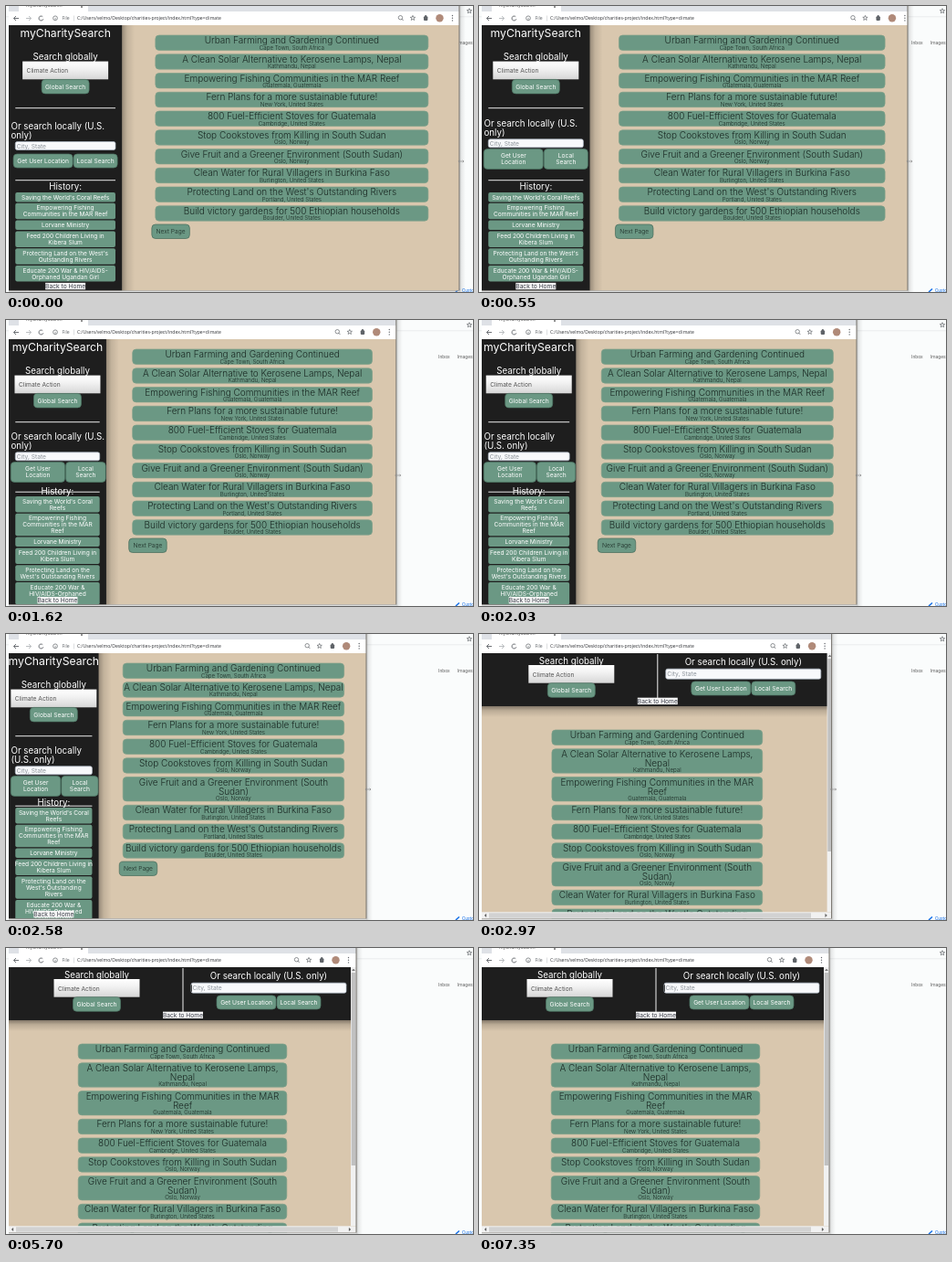
Animation, 512 px wide and 313 px high, one loop 7.45 s. Source, as an HTML page with a canvas:

```html
<!DOCTYPE html>
<html lang="en">
<head>
<meta charset="utf-8">
<title>Resizing a charity search page</title>
<style>
html, body { margin: 0; width: 100%; height: 100%; overflow: hidden; background: #fafcfc; }
canvas { display: block; width: 512px; height: 313px; }
</style>
</head>
<body>
<canvas id="stage" width="512" height="313"></canvas>
<script>
const ctx = document.getElementById('stage').getContext('2d');
const LOOP = 7450, LEFT = 3, BOTTOM = 311.5, BREAKPOINT = 390;
const GREEN = '#6b9884', DARK = '#1e1e1e', TAN = '#d9c7ae', INK = '#1b2a24';
const BODY = 6.67, HEADING = 9.75;

// Piecewise linear motion: [time, value, ...]
const edgeTrack = [[0, 497], [550, 470], [785, 455], [1150, 435.7], [1585, 429],
  [2030, 414], [2370, 406], [2580, 395], [3090, 384]];
const layoutTrack = [[0, 498], [550, 475.5], [785, 459], [1150, 436.7], [1585, 430],
  [2030, 414.7], [2370, 407], [2580, 395.7], [3000, 387], [3310, 384]];
const pointerTrack = [[3100, 390, 167], [3960, 390, 167], [4350, 424, 226],
  [4700, 467, 296], [4900, 504, 316]];

// Title, place, card width below which the title breaks at "|"
const cards = [
  ['Urban Farming and Gardening Continued', 'Cape Town, South Africa', 0],
  ['A Clean Solar Alternative to Kerosene Lamps,| Nepal', 'Kathmandu, Nepal', 238],
  ['Empowering Fishing Communities in the MAR| Reef', 'Guatemala, Guatemala', 235],
  ['Fern Plans for a more sustainable future!', 'New York, United States', 0],
  ['800 Fuel-Efficient Stoves for Guatemala', 'Cambridge, United States', 0],
  ['Stop Cookstoves from Killing in South Sudan', 'Oslo, Norway', 0],
  ['Give Fruit and a Greener Environment (South| Sudan)', 'Oslo, Norway', 246],
  ['Clean Water for Rural Villagers in Burkina Faso', 'Burlington, United States', 0],
  ["Protecting Land on the West's Outstanding| Rivers", 'Portland, United States', 234],
  ['Build victory gardens for 500 Ethiopian| households', 'Boulder, United States', 230]
];

// Line breaks for the wide, medium and narrow sidebar
const historyItems = [
  ["Saving the World's Coral Reefs", "Saving the World's Coral|Reefs"],
  ['Empowering Fishing|Communities in the MAR Reef', 'Empowering Fishing|Communities in the MAR|Reef'],
  ['Lorvane Ministry'],
  ['Feed 200 Children Living in|Kibera Slum'],
  ["Protecting Land on the West's|Outstanding Rivers", "Protecting Land on the|West's Outstanding Rivers",
    "Protecting Land on the|West's Outstanding|Rivers"],
  ['Educate 200 War & HIV/AIDS-|Orphaned Ugandan Girl', 'Educate 200 War &|HIV/AIDS-Orphaned|Ugandan Girl']
];

function sample(track, t, column = 1) {
  if (t <= track[0][0]) return track[0][column];
  for (let i = 1; i < track.length; i++) {
    const a = track[i - 1], b = track[i];
    if (t <= b[0]) return a[column] + (b[column] - a[column]) * (t - a[0]) / (b[0] - a[0]);
  }
  return track[track.length - 1][column];
}

function rect(x, y, w, h, color) {
  ctx.fillStyle = color;
  ctx.fillRect(x, y, w, h);
}

function box(x, y, w, h, radius, fill, stroke) {
  ctx.beginPath();
  ctx.roundRect(x, y, w, h, radius);
  ctx.fillStyle = fill;
  ctx.fill();
  if (stroke) {
    ctx.strokeStyle = stroke;
    ctx.lineWidth = 0.7;
    ctx.stroke();
  }
}

// y is the middle of the capital letters
function text(str, x, y, size, color, align = 'center', weight = 400, family = 'Inter') {
  ctx.font = `${weight} ${size}px ${family}, sans-serif`;
  ctx.textAlign = align;
  ctx.fillStyle = color;
  ctx.fillText(str, x, y + size * 0.36);
}

function path(points, color, width = 0.9, fill) {
  ctx.beginPath();
  points.forEach(([x, y]) => ctx.lineTo(x, y));
  if (fill) {
    ctx.closePath();
    ctx.fillStyle = fill;
    ctx.fill();
  }
  ctx.strokeStyle = color;
  ctx.lineWidth = width;
  ctx.stroke();
}

function circle(x, y, r, fill, stroke) {
  ctx.beginPath();
  ctx.arc(x, y, r, 0, Math.PI * 2);
  if (fill) { ctx.fillStyle = fill; ctx.fill(); }
  if (stroke) { ctx.strokeStyle = stroke; ctx.lineWidth = 0.7; ctx.stroke(); }
}

function shade(x, y, w, h, dx, dy, alpha) {
  const g = ctx.createLinearGradient(x, y, x + dx, y + dy);
  g.addColorStop(0, `rgba(0,0,0,${alpha})`);
  g.addColorStop(0.4, `rgba(0,0,0,${alpha * 0.35})`);
  g.addColorStop(1, 'rgba(0,0,0,0)');
  rect(x, y, w, h, g);
}

function star(x, y) {
  const points = Array.from({ length: 11 }, (_, i) => {
    const r = i % 2 ? 1.2 : 2.8, a = i * Math.PI / 5 - Math.PI / 2;
    return [x + r * Math.cos(a), y + r * Math.sin(a)];
  });
  path(points, '#5f6368', 0.7);
}

function button(x, y, w, h, lines) {
  box(x, y, w, h, 4, GREEN, '#4f7a68');
  lines.forEach((line, i) =>
    text(line, x + w / 2, y + h / 2 + (i - (lines.length - 1) / 2) * 7, BODY, '#fff'));
}

function searchField(mid, y) {
  const g = ctx.createLinearGradient(0, y, 0, y + 20);
  g.addColorStop(0, '#fff');
  g.addColorStop(0.4, '#f2f2f2');
  g.addColorStop(1, '#d6d6d6');
  rect(mid - 47, y, 94, 19.7, g);
  text('Climate Action', mid - 42.5, y + 10.2, BODY, '#555', 'left');
  button(mid - 26, y + 19.8, 52, 15.5, ['Global Search']);
}

function cityField(x, y, w, h) {
  box(x, y, w, h, 2, '#f8f9fb', '#b4becb');
  text('City, State', x + 1.5, y + h / 2 + 0.3, BODY, '#8d949b', 'left');
}

function homeLink(x, y) {
  rect(x - 22, y - 3.8, 44, 7.4, '#f4f4f4');
  text('Back to Home', x, y, BODY, '#3c3f4a');
}

function backdrop() {
  rect(0, 0, 512, 313, '#fafcfc');
  rect(0, 11.5, 512, 0.7, '#e3e5e7');
  star(508, 5.5);
  text('Inbox', 474, 40, 5.2, '#666', 'left', 400, 'Roboto');
  text('Images', 494.5, 40, 5.2, '#666', 'left', 400, 'Roboto');
  path([[493, 313], [497, 309.5]], '#1a73e8', 1.6);
  text('Customize', 500, 311.5, 5, '#1a73e8', 'left', 400, 'Roboto');
}

function toolbar(right) {
  rect(0, 0, right, 8, '#dee1e6');
  box(14, -4, 76, 13, 3, '#fff');
  text('myCharitySearch', 22, -0.7, 5, '#555', 'left', 400, '"Open Sans"');
  path([[82, 0], [84, 2]], '#666', 0.7);
  path([[84, 0], [82, 2]], '#666', 0.7);
  rect(0, 6, right, 15, '#fff');
  const grey = '#5f6368';
  path([[14, 13.5], [8.5, 13.5]], grey);
  path([[11, 11], [8.5, 13.5], [11, 16]], grey);
  path([[22, 13.5], [27.5, 13.5]], '#b4b7ba');
  path([[25, 11], [27.5, 13.5], [25, 16]], '#b4b7ba');
  ctx.beginPath();
  ctx.arc(38.5, 13.5, 2.5, 0.3, 5.5);
  ctx.strokeStyle = grey;
  ctx.stroke();
  circle(54, 13.3, 2.4, null, grey);
  rect(53.7, 13, 0.7, 1.7, grey);
  text('File', 61.5, 13.3, 5.1, grey, 'left', 400, '"Open Sans"');
  rect(74, 10.5, 0.6, 6, '#c5c8cb');
  text('C:/Users/velmo/Desktop/charities-project/index.html?type=climate',
    78, 13.3, 5.1, '#303236', 'left', 400, '"Open Sans"');
  circle(right - 65.5, 12.7, 2.2, null, grey);
  path([[right - 64, 14.2], [right - 62.5, 15.8]], grey);
  star(right - 52, 13.2);
  box(right - 40, 11.5, 4.4, 4.4, 0.8, grey);
  circle(right - 37.8, 11.2, 1.2, grey);
  circle(right - 22.5, 13.2, 4.2, '#b08a79');
  for (const y of [10.5, 13.2, 15.9]) circle(right - 8.5, y, 0.7, grey);
}

function cardList(mid, width, top) {
  let y = top;
  for (const [title, place, minWidth] of cards) {
    const lines = width < minWidth ? title.split('|') : [title.replace('|', '')];
    const extra = (lines.length - 1) * 10;
    box(mid - width / 2, y, width, 16.4 + extra, 4, GREEN, '#7d9f88');
    lines.forEach((line, i) => text(line.trim(), mid, y + 5.4 + i * 10, 10, INK, 'center', 300));
    text(place, mid, y + 13.3 + extra, 6.15, INK, 'center', 300);
    y += 20.75 + extra;
  }
  const x = mid - width / 2 - 4;
  box(x, y - 0.5, 41.5, 15.5, 4, GREEN, '#456b5a');
  text('Next Page', x + 20.7, y + 7.3, BODY, INK, 'center', 300);
}

function sidebar(width) {
  const mid = LEFT + width / 2, inner = width - 14.5, x = mid - inner / 2;
  const level = width > 113 ? 0 : width > 101 ? 1 : 2;
  shade(LEFT + width, 21, 14, 292, 14, 0, 0.3);
  rect(LEFT, 21, width, 292, DARK);
  text('myCharitySearch', mid, 29.3, 12.2, '#fff');
  text('Search globally', mid, 55.7, HEADING, '#fff');
  searchField(mid, 60.6);
  rect(x, 111.2, inner, 1, '#e8e8e8');

  // The local search block moves up once its buttons take two lines
  const oneLine = width > 120, wide = width > 105.5;
  const top = oneLine ? 131.3 : level ? 127.6 : 128.6;
  text(wide ? 'Or search locally (U.S.' : 'Or search locally', 5.5, top, HEADING, '#fff', 'left');
  text(wide ? 'only)' : '(U.S. only)', 5.5, top + 10, HEADING, '#fff', 'left');
  cityField(x, top + 17.2, inner, 9);
  const total = Math.min(114, width - 3), first = total * 0.57;
  const by = oneLine ? 162 : top + 28, bh = oneLine ? 15 : 21.8;
  const bx = oneLine ? mid - total / 2 : 5.3;
  button(bx, by, first, bh, oneLine ? ['Get User Location'] : ['Get User', 'Location']);
  button(bx + first + 1, by, total - first - 1, bh, oneLine ? ['Local Search'] : ['Local', 'Search']);

  rect(x, level ? 187.7 : 190.2, inner, 1, '#e8e8e8');
  text('History:', mid, [197, 187.7, 184.5][level], HEADING, '#fff');
  let y = [204, 193, 190][level];
  for (const variants of historyItems) {
    const lines = variants[Math.min(level, variants.length - 1)].split('|');
    const h = 3.5 + 7 * lines.length;
    box(x, y, inner, h, 2, GREEN);
    lines.forEach((line, i) => text(line, mid, y + 5.2 + i * 7, 6.6, '#fff'));
    y += h + 1.3;
  }
  homeLink(mid, 306.7);
}

function widePage(right) {
  const width = (right - LEFT) / 4, content = right - LEFT - width;
  rect(LEFT, 21, right, 292, TAN);
  cardList(LEFT + width + content / 2 + 1, Math.min(299, content * 0.823), 32);
  sidebar(width + 0.5);
}

function narrowPage(right, caretOn) {
  const mid = (LEFT + right) / 2;
  rect(LEFT, 21, right, 292, TAN);
  cardList(mid, (right - LEFT) * 0.6, 105);
  shade(LEFT, 79, right, 12, 0, 12, 0.4);
  rect(LEFT, 21, right, 58, DARK);
  rect(mid, 22, 1, 48, '#f2f2f2');
  text('Search globally', mid - 94, 29.3, HEADING, '#fff');
  searchField(mid - 94, 34);
  text('Or search locally (U.S. only)', mid + 94.5, 30.3, HEADING, '#fff');
  cityField(mid + 9.5, 38.2, 170, 11);
  if (caretOn) rect(203.2, 40.3, 0.8, 7.5, '#222');
  button(mid + 37.5, 52, 65, 15, ['Get User Location']);
  button(mid + 103.5, 52, 48, 15, ['Local Search']);
  homeLink(mid + 0.5, 73.5);

  rect(right - 6, 21, 6, 283, '#f1f1f1');
  rect(right - 5.3, 27, 4.4, 211, '#c1c1c1');
  rect(LEFT, 304.3, right, 9, '#f1f1f1');
  rect(11, 305.3, 353, 5.4, '#d2d2d2');
  const arrow = '#606060';
  path([[8, 306.3], [6, 308], [8, 309.7]], arrow, 0.3, arrow);
  path([[right - 8, 306.3], [right - 6, 308], [right - 8, 309.7]], arrow, 0.3, arrow);
  path([[right - 4.6, 24.7], [right - 3, 23], [right - 1.4, 24.7]], arrow, 0.3, arrow);
}

function resizeCursor(x, y) {
  for (const side of [-1, 1]) {
    path([[x, y], [x + 3 * side, y]], '#888', 0.7);
    path([[x + 1.7 * side, y - 1.3], [x + 3 * side, y], [x + 1.7 * side, y + 1.3]], '#888', 0.7);
  }
}

function pointer(x, y) {
  const shape = [[0, 0], [0, 6], [1.4, 4.8], [2.4, 7], [3.3, 6.6], [2.4, 4.4], [4.2, 4.3], [0, 0]];
  path(shape.map(([dx, dy]) => [x + dx, y + dy]), '#333', 0.6, '#fff');
}

function draw(t) {
  const edge = sample(edgeTrack, t), layout = sample(layoutTrack, t);
  const caretOn = t > 3100 && Math.floor((t - 3130) / 515) % 2 === 0;
  backdrop();
  shade(edge, 0, 7, 313, 7, 0, 0.2);

  ctx.save();
  ctx.beginPath();
  ctx.rect(LEFT, 0, edge - LEFT, BOTTOM);
  ctx.clip();
  toolbar(layout);
  if (layout > BREAKPOINT) widePage(layout);
  else narrowPage(layout, caretOn);
  ctx.restore();
  rect(edge - 0.5, 0, 1, BOTTOM, '#77736d');
  rect(LEFT, BOTTOM, edge - LEFT, 0.8, '#8b8b8b');

  if (t < 3100) resizeCursor(edge + 2, 170);
  else if (t < 4900) pointer(sample(pointerTrack, t), sample(pointerTrack, t, 2));
  else if (t > 6900 && t < 7080) {
    const k = (t - 6900) / 180;
    pointer(497 + 5 * k, 303 + 10 * k);
  }
}

const start = performance.now();
function tick() {
  draw((performance.now() - start) % LOOP);
  requestAnimationFrame(tick);
}
tick();
</script>
</body>
</html>
```
